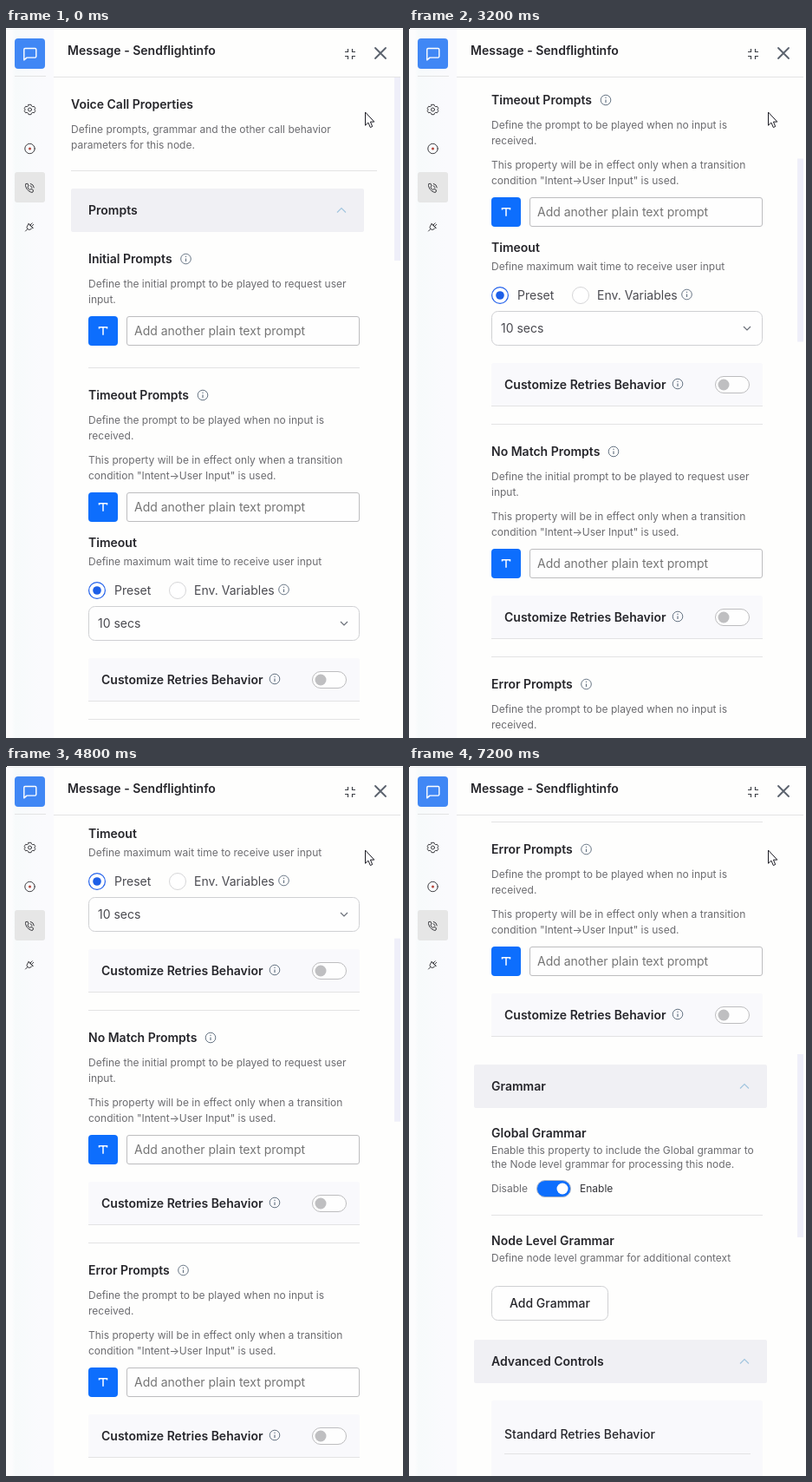
An HTML page for the animation above (8 s loop, 458 by 818 pixels).

```html
<!DOCTYPE html>
<html lang="en">
<head>
<meta charset="utf-8">
<title>Voice call properties</title>
<style>
@property --s { syntax: "<number>"; inherits: true; initial-value: 0; }
html, body { margin: 0; width: 100%; height: 100%; overflow: hidden; background: #fefefd; }
svg { display: block; }
#stage { animation: scroll 8s step-end infinite; }
#page { transform: translateY(calc(var(--s) * -1px)); }
#thumb { fill: #efeff9; transform: translateY(calc(var(--s) * .275px)); }
#speck { animation: speck 8s step-end infinite; }
@keyframes speck { 0% { opacity: 0; } 7.5%, 100% { opacity: 1; } }

/* Wheel ticks of 125px, sampled every 200ms */
@keyframes scroll {
  0% { --s: 0; }
  22.5% { --s: 55; } 25% { --s: 230; } 27.5% { --s: 250; }
  40% { --s: 340; } 42.5% { --s: 374; } 45% { --s: 375; }
  50% { --s: 440; } 52.5% { --s: 499; } 55% { --s: 500; }
  60% { --s: 515; } 62.5% { --s: 615; } 65% { --s: 625; }
  70% { --s: 740; } 72.5% { --s: 750; }
  77.5% { --s: 834; } 80% { --s: 960; } 82.5%, 100% { --s: 1000; }
}

text { font: 400 14px Inter, sans-serif; fill: #4a4a50; white-space: pre; }
.h { font-weight: 600; fill: #26262b; }
.m { font-weight: 500; fill: #26262b; }
.d { font-size: 12px; fill: #6c6c70; }
.hint { fill: #757575; }
.rule { fill: #e3e3e4; }
.bar { fill: #f0f0f4; }
.card { fill: #f9f9fc; }
.blue { fill: #0d6efd; }
.box { fill: #fefefe; stroke: #bdbdbf; }
.soft { stroke: #cfd0d3; }
.ico { fill: none; stroke: #3c3c40; stroke-linecap: round; stroke-linejoin: round; }
.fold { fill: none; stroke: #a3c6df; stroke-width: 1.2; }
</style>
</head>
<body>
<svg id="stage" width="458" height="818" viewBox="0 0 458 818">
  <defs>
    <clipPath id="view"><rect x="55" y="57" width="403" height="761"/></clipPath>
    <linearGradient id="side">
      <stop offset=".12" stop-color="#fcfcfd"/>
      <stop offset=".2" stop-color="#f7fafb"/>
      <stop offset=".75" stop-color="#fafafd"/>
    </linearGradient>
    <g id="info" fill="none" stroke="#687685">
      <circle r="5.8"/>
      <path d="M0-.5V3M0-3.2v1.2" stroke-width="1.2"/>
    </g>
    <g id="row">
      <rect class="blue" x="95" width="34" height="34" rx="4"/>
      <path d="M107.5 14.5v-1.8h9v1.8M112 12.7v9" fill="none" stroke="#fff" stroke-width="1.5"/>
      <rect class="box" x="139.5" y=".5" width="268" height="33" rx="2.5"/>
      <text class="hint" x="148" y="22">Add another plain text prompt</text>
    </g>
    <g id="retries">
      <rect class="card" x="95" width="313" height="50" rx="3"/>
      <rect class="rule" x="95" y="49" width="313" height="1"/>
      <text class="h" x="110" y="30">Customize Retries Behavior</text>
      <use href="#info" x="310" y="24"/>
      <rect class="box" x="353.5" y="15.5" width="39" height="19" rx="9.5"/>
      <circle cx="363" cy="25" r="6.5" fill="#bfbfc1"/>
    </g>
    <g id="intent">
      <text class="d" x="95">This property will be in effect only when a transition</text>
      <text class="d" x="95" y="18">condition "Intent→User Input" is used.</text>
    </g>
    <g id="noinput">
      <text class="d" x="95">Define the prompt to be played when no input is</text>
      <text class="d" x="95" y="18">received.</text>
    </g>
    <g id="initial">
      <text class="d" x="95">Define the initial prompt to be played to request user</text>
      <text class="d" x="95" y="18">input.</text>
    </g>
    <g id="bar">
      <rect class="bar" x="75" width="338" height="50" rx="2"/>
      <path class="fold" d="M382 27.5l5-5 5 5"/>
    </g>
    <rect id="rule" class="rule" x="95" width="313" height="1"/>
  </defs>

  <rect width="458" height="818" fill="#fefefd"/>
  <rect width="55" height="818" fill="url(#side)"/>
  <rect y="1" width="458" height="1" fill="#f0f0f1"/>
  <rect id="speck" width="1" height="1"/>

  <!-- sidebar -->
  <rect x="10" y="12" width="35" height="35" rx="4" fill="#4087f5"/>
  <path d="M22 23.5h11.5a1.3 1.3 0 0 1 1.3 1.3v8a1.3 1.3 0 0 1-1.3 1.3H24l-3.2 2.8V24.8a1.3 1.3 0 0 1 1.2-1.3z"
        fill="none" stroke="#fff" stroke-width="1.4" stroke-linejoin="round"/>
  <rect class="rule" x="10" y="55" width="36" height="1"/>
  <g class="ico" transform="translate(27.5 94)">
    <path d="M-1.5-5.7h3l.5 1.6 1.3.8 1.7-.4 1.3 2.4-1.1 1.3 1.1 1.4L5 3.7l-1.7-.4-1.3.8-.5 1.6h-3L-2 4.1l-1.3-.8-1.7.4-1.3-2.3L-5.2 0l-1.1-1.3L-5-3.7l1.7.4 1.3-.8z"/>
    <circle r="2"/>
  </g>
  <circle class="ico" cx="27.5" cy="139" r="5.7"/>
  <circle cx="27.5" cy="139" r="1.5" fill="#b5473c"/>
  <rect x="10" y="166" width="35" height="35" rx="3" fill="#e6e6e6"/>
  <g class="ico" transform="translate(27.5 184)">
    <path d="M-4.6-4.2l2-.6 1.3 2.8-1.3 1.2Q-1.8 1.6.1 2.5l1.4-1.2 2.5 1.5-.5 2.2Q2.7 5.8.8 5-4.2 2.4-5-2.3-5.2-3.7-4.6-4.2z"/>
    <path d="M.6-2.2Q2.2-1.7 2.5 0M.8-4.6Q4.4-3.9 4.8-.2"/>
  </g>
  <g class="ico" transform="translate(27.5 229)">
    <path d="M-1-3.2L3.2 1 1.7 2.5Q-.6 4.4-2.8 2.6-4.5.5-2.5-1.7zM-2.9 2.8L-5 5M.4-1.8l2.4-2.4M1.9-.3l2.4-2.4M-1.6-3.8L3.8 1.6"/>
  </g>

  <!-- panel header -->
  <text class="h" x="71" y="31">Message - Sendflightinfo</text>
  <rect class="rule" x="55" y="56" width="400" height="1"/>
  <path d="M391 27.5h3.5V24M399.5 24v3.5h3.5M403 32.5h-3.5V36M394.5 36v-3.5H391"
        fill="none" stroke="#3f4248" stroke-width="1.2"/>
  <path d="M426 23l12 12M438 23l-12 12" stroke="#59616c" stroke-width="1.8" stroke-linecap="round"/>

  <g clip-path="url(#view)">
    <g id="page">
      <text class="h" x="75" y="93">Voice Call Properties</text>
      <text class="d" x="75" y="121">Define prompts, grammar and the other call behavior</text>
      <text class="d" x="75" y="139">parameters for this node.</text>
      <rect class="rule" x="75" y="164" width="353" height="1"/>

      <use href="#bar" y="185"/>
      <text class="h" x="95" y="215">Prompts</text>
      <text class="h" x="95" y="271">Initial Prompts</text>
      <use href="#info" x="207.5" y="266"/>
      <use href="#initial" y="299"/>
      <use href="#row" y="332"/>
      <use href="#rule" y="391"/>

      <text class="h" x="95" y="428">Timeout Prompts</text>
      <use href="#info" x="227" y="423"/>
      <use href="#noinput" y="456"/>
      <use href="#intent" y="502"/>
      <use href="#row" y="535"/>
      <text class="h" x="95" y="598">Timeout</text>
      <text class="d" x="95" y="619">Define maximum wait time to receive user input</text>
      <circle cx="105" cy="648" r="9.4" fill="#fff" stroke="#2563eb" stroke-width="1.2"/>
      <circle cx="105" cy="648" r="4.8" fill="#1d5fe8"/>
      <text x="125" y="653">Preset</text>
      <circle cx="198" cy="648" r="9.5" fill="#fff" stroke="#d6d6d8"/>
      <text x="217" y="653">Env. Variables</text>
      <use href="#info" x="320.5" y="647"/>
      <rect class="box soft" x="95.5" y="666.5" width="312" height="39" rx="7"/>
      <text x="106" y="691">10 secs</text>
      <path d="M386 684l4 4 4-4" fill="none" stroke="#6a6f78" stroke-width="1.2"/>
      <use href="#retries" y="726"/>
      <use href="#rule" y="796"/>

      <text class="h" x="95" y="833">No Match Prompts</text>
      <use href="#info" x="236" y="828"/>
      <use href="#initial" y="861"/>
      <use href="#intent" y="907"/>
      <use href="#row" y="940"/>
      <use href="#retries" y="994"/>
      <use href="#rule" y="1064"/>

      <text class="h" x="95" y="1101">Error Prompts</text>
      <use href="#info" x="204.5" y="1096"/>
      <use href="#noinput" y="1129"/>
      <use href="#intent" y="1175"/>
      <use href="#row" y="1208"/>
      <use href="#retries" y="1262"/>

      <use href="#bar" y="1344"/>
      <text class="h" x="95" y="1374">Grammar</text>
      <text class="h" x="95" y="1428">Global Grammar</text>
      <text class="d" x="95" y="1447">Enable this property to include the Global grammar to</text>
      <text class="d" x="95" y="1463">the Node level grammar for processing this node.</text>
      <text class="d" x="95" y="1491">Disable</text>
      <rect class="blue" x="147.5" y="1477.5" width="39" height="19" rx="9.5" stroke="#a9b4c6"/>
      <circle cx="177" cy="1487" r="6.5" fill="#fff"/>
      <text class="d" x="197" y="1491" style="fill:#36363b">Enable</text>
      <use href="#rule" y="1517"/>

      <text class="h" x="95" y="1552">Node Level Grammar</text>
      <text class="d" x="95" y="1571">Define node level grammar for additional context</text>
      <rect class="box soft" x="95.5" y="1599.5" width="134" height="39" rx="7"/>
      <text class="m" x="116" y="1624">Add Grammar</text>

      <use href="#bar" y="1661"/>
      <text class="h" x="95" y="1691">Advanced Controls</text>
      <rect class="card" x="95" y="1731" width="313" height="120" rx="3"/>
      <text class="m" x="110" y="1775">Standard Retries Behavior</text>
      <rect class="rule" x="110" y="1792" width="284" height="1"/>
    </g>
    <rect id="thumb" x="448" y="57" width="7" height="211"/>
  </g>

  <path d="M414.5 97v15.2l3.4-3.2 2.4 5.5 2.4-1-2.3-5.4h4.4z" fill="#fff" stroke="#1c1c24" stroke-linejoin="round"/>
</svg>
</body>
</html>
```
